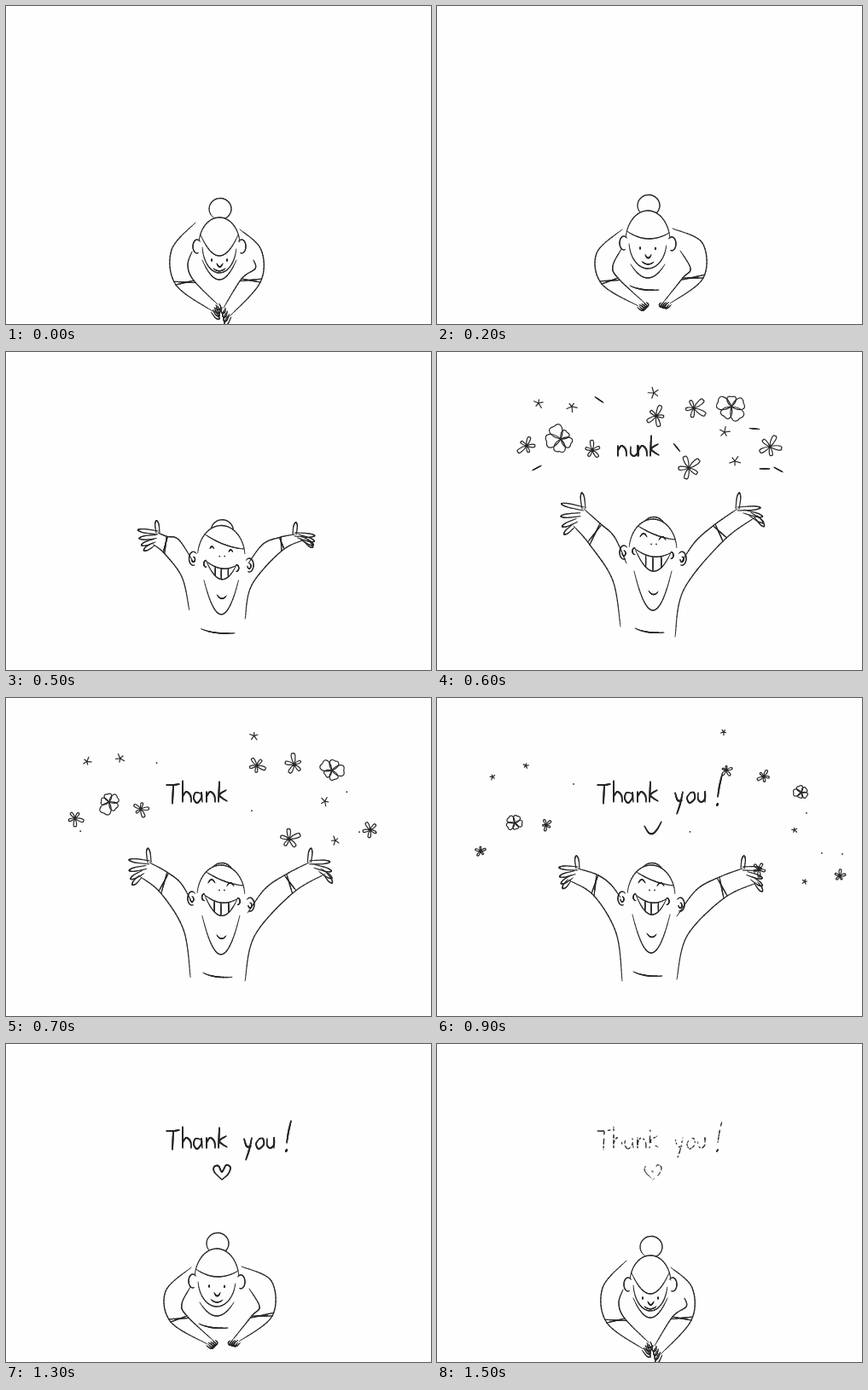
An HTML page with a canvas that plays this animation: 498x373 px, repeating every 1.6 s.

```html
<!DOCTYPE html>
<html lang="en">
<head>
<meta charset="utf-8">
<title>Thank you</title>
<style>
  html, body { margin: 0; width: 100%; height: 100%; overflow: hidden; background: #fdfefd; }
  canvas { display: block; width: 498px; height: 373px; }
</style>
</head>
<body>
<canvas id="stage" role="img" aria-label="Thank you !"></canvas>
<script>
const W = 498, H = 373, STEP = 100, STEPS = 16, N = 30, CUFF = 20;
const PAPER = '#fdfefd', INK = '#262626';
const canvas = document.getElementById('stage');
const ctx = canvas.getContext('2d');
const dpr = window.devicePixelRatio || 1;
canvas.width = W * dpr;
canvas.height = H * dpr;
ctx.scale(dpr, dpr);
ctx.lineCap = ctx.lineJoin = 'round';

const lerp = (a, b, t) => a + (b - a) * t;
const between = (p, q, t) => [lerp(p[0], q[0], t), lerp(p[1], q[1], t)];
const hash = (x, y) => {
  const v = Math.sin(x * 12.9898 + y * 78.233) * 43758.5453;
  return v - Math.floor(v);
};

// Lines are N + 1 samples
const sample = f => Array.from({ length: N + 1 }, (_, i) => f(i / N));

function curve(n) {
  const last = n.length / 2 - 1;
  return sample(s => {
    const i = Math.min(last - 1, Math.floor(s * last)), t = s * last - i;
    return [0, 1].map(c => {
      const at = k => n[2 * Math.max(0, Math.min(last, k)) + c];
      const a = at(i - 1), b = at(i), d = at(i + 1), e = at(i + 2);
      return b + t * ((d - a) + t * ((2 * a - 5 * b + 4 * d - e) + t * (3 * (b - d) + e - a))) / 2;
    });
  });
}
const line = (p, q) => sample(t => between(p, q, t));
const arc = (x, y, rx, ry, from, to) => sample(t => {
  const a = lerp(from, to, t) * Math.PI;
  return [x + rx * Math.cos(a), y + ry * Math.sin(a)];
});
const sagging = (x1, y1, x2, y2, sag) =>
  sample(t => [lerp(x1, x2, t), lerp(y1, y2, t) + sag * 4 * t * (1 - t)]);

// Pen pressure fades at both ends; loss wears holes into the line
function ink(pts, width = 1.35, loss = 0) {
  for (let i = 0; i < N; i++) {
    const [x, y] = pts[i];
    if (loss && hash(Math.floor(x / 1.6), Math.floor(y / 1.6)) < loss) continue;
    ctx.lineWidth = width * (.55 + .45 * Math.sqrt(Math.sin(Math.PI * (i + .5) / N)));
    ctx.beginPath();
    ctx.moveTo(x, y);
    ctx.lineTo(...pts[i + 1]);
    ctx.stroke();
  }
}
function dot(x, y, r) {
  ctx.beginPath();
  ctx.arc(x, y, r, 0, 7);
  ctx.fill();
}

// Arms: outer and inner edge from the shoulder to the wrist
const base = {
  x: 250, half: 26, out: 2, sag: 5, lid: 0, lips: 7, smile: 3, open: 0, collar: 20,
  hemW: 13, finger: 12, bend: 0, spread: 0, thumb: 0, side: 0, whoosh: 0
};
const bow = {
  ...base, top: 248, ear: 280, bun: 238, half: 24, browL: 268, browR: 268, sag: 25,
  eye: 298, chin: 313, neck: 298, vee: 321, hem: 333, hemW: 0, bend: 20, spread: 6,
  outL: [222, 254, 194, 286, 199, 327, 242, 358], inL: [218, 288, 213, 304, 220, 322, 248, 350],
  outR: [274, 262, 299, 286, 298, 324, 262, 364], inR: [290, 298, 292, 308, 276, 320, 255, 354]
};
const crouch = {
  ...base, x: 247, top: 240, ear: 276, bun: 234, browL: 264, browR: 266, sag: 8,
  eye: 284, chin: 308, neck: 303, vee: 319, hem: 333, finger: 8, bend: 5, spread: 5,
  outL: [217, 262, 187, 290, 193, 326, 236, 352], inL: [216, 285, 206, 305, 212, 319, 244, 349],
  outR: [276, 261, 311, 278, 312, 319, 273, 349], inR: [285, 287, 297, 308, 288, 319, 264, 349]
};
const push = {
  ...base, half: 27, top: 226, ear: 262, bun: 219, browL: 243, browR: 264, eye: 271, lid: 3,
  chin: 299, neck: 300, vee: 322, collar: 15, hem: 332, hemW: 24, finger: 14, side: 21, whoosh: 1,
  outL: [211, 239, 185, 229, 180, 262, 196, 296], inL: [214, 244, 207, 253, 206, 268, 210, 291],
  outR: [278, 250, 297, 234, 311, 262, 296, 304], inR: [284, 250, 285, 256, 286, 268, 278, 301]
};
const cheer = {
  ...base, x: 253, half: 28, out: 6, top: 196, ear: 233, bun: 206, browL: 204, browR: 220, sag: 3,
  eye: 217, lid: -4, chin: 238, lips: 21, smile: 7, open: 17, neck: 257, vee: 303, collar: 22,
  hem: 329, finger: 27, bend: -60, spread: -18, thumb: 19,
  outL: [222, 248, 208, 217, 191, 201, 172, 184], inL: [215, 322, 206, 268, 179, 226, 160, 204],
  outR: [286, 247, 303, 222, 326, 202, 352, 184], inR: [279, 334, 289, 279, 335, 222, 374, 193]
};
const beam = {
  ...cheer, x: 251, lips: 18, open: 14, neck: 254, vee: 299, hem: 326, finger: 22, bend: -50, thumb: 15,
  outL: [215, 234, 203, 218, 187, 207, 165, 200], inL: [217, 332, 210, 276, 184, 232, 155, 214],
  outR: [281, 256, 304, 225, 331, 210, 358, 200], inR: [281, 330, 293, 279, 336, 235, 374, 217]
};
const settle = {
  ...base, x: 251, out: 6, top: 213, ear: 250, bun: 209, browL: 237, browR: 240, sag: -4,
  eye: 247, chin: 284, lips: 12, smile: 4, open: 5, neck: 286, vee: 298, collar: 13,
  hem: 327, hemW: 8, finger: 22, bend: -58, spread: -8, thumb: 6,
  outL: [214, 238, 196, 234, 177, 235, 138, 264], inL: [216, 313, 212, 272, 176, 264, 152, 277],
  outR: [283, 248, 305, 237, 337, 233, 379, 257], inR: [281, 321, 289, 271, 337, 260, 366, 267]
};
const keys = [
  [0, bow], [2, crouch], [4, push], [6, cheer], [9, beam], [11, settle], [13, crouch], [15, bow]
];

function poseAt(step) {
  const i = Math.max(1, keys.findIndex(k => k[0] >= step));
  const [from, a] = keys[i - 1], [to, b] = keys[i];
  const u = (step - from) / (to - from), t = u * (2 - u);
  return Object.fromEntries(Object.keys(a).map(k =>
    [k, Array.isArray(a[k]) ? a[k].map((v, j) => lerp(v, b[k][j], t)) : lerp(a[k], b[k], t)]));
}

function finger([x, y], angle, length) {
  const c = Math.cos(angle), s = Math.sin(angle);
  const at = (u, v) => [x + c * u - s * v, y + s * u + c * v];
  ink(curve([at(0, -2), at(length * .7, -2.2), at(length, 0), at(length * .7, 2.2), at(0, 2)].flat()));
}

function drawArm(p, outer, inner, side) {
  const a = curve(outer), b = curve(inner), tip = a[N], heel = b[N];
  ink(a);
  ink(b);
  ink(line(a[CUFF], b[CUFF]));
  ink(line(a[CUFF - 1], b[CUFF + 1]));
  const from = between(a[CUFF], b[CUFF], .5), to = between(tip, heel, .5);
  const aim = Math.atan2(to[1] - from[1], to[0] - from[0]);
  for (let i = 0; i < 4; i++) {
    const turn = (p.bend + p.spread * (i - 1.5)) * Math.PI / 180;
    finger(between(tip, heel, i / 3), aim + side * turn, p.finger * (1 - .15 * i));
  }
  if (p.thumb > 3) finger(tip, -Math.PI / 2 + side * -.12, p.thumb);
}

function drawBody(p) {
  drawArm(p, p.outL, p.inL, 1);
  drawArm(p, p.outR, p.inR, -1);
  ink(sagging(p.x - p.collar, p.neck, p.x + p.collar, p.neck, p.vee - p.neck));
  if (p.hemW > 3) {
    ink(sagging(p.x - p.hemW - 8, p.hem - 5, p.x + p.hemW - 6, p.hem, 2));
    ink(sagging(p.x - p.hemW, p.hem - 2, p.x + p.hemW, p.hem, 1));
  }
  if (p.side > 15) for (const x of [p.x - 38, p.x + 27]) ink(line([x, p.hem - p.side], [x, p.hem]));
  if (p.whoosh === 1) {
    const [x, y] = p.outL.slice(-2), [u, v] = p.outR.slice(-2);
    ink(curve([x - 24, y - 37, x - 26, y - 22, x - 22, y - 8]));
    for (const i of [0, 1]) ink(line([u + 20 - 8 * i, v - 8], [u, v + 28 - 9 * i]));
  }
}

function drawHead(p) {
  const { x, half, top, ear, eye, chin } = p, tilt = p.browR - p.browL, grin = p.open > 9;
  ink(arc(x + 1, p.bun, 13, 12.5, .7, 2.6));
  ctx.fillStyle = PAPER;
  ctx.beginPath();
  ctx.ellipse(x, ear, half, ear - top, 0, Math.PI, 0);
  ctx.ellipse(x, ear, half - 4, Math.max(1, chin - ear), 0, 0, Math.PI);
  ctx.fill();
  ctx.fillStyle = INK;

  ink(arc(x, ear, half, ear - top, 1.04, 1.97));
  const edge = y => half * Math.sqrt(Math.max(0, 1 - ((ear - y) / (ear - top)) ** 2));
  ink(sagging(x - edge(p.browL), p.browL, x + edge(p.browR), p.browR, p.sag));
  if (!grin) ink(arc(x, ear, half - 4, chin - ear, .97, .05));
  for (const s of [-1, 1]) {
    const drop = s > 0 ? tilt * .45 : 0, ex = x + s * (half + p.out);
    ink(arc(ex, ear + 2 + drop, 5, 8, s < 0 ? 1.75 : 1.25, s < 0 ? .4 : 2.6));
    if (p.out > 3) ink(arc(ex, ear + 3 + drop, 2, 3, -.5, 1));
    const w = Math.min(4, Math.abs(p.lid)), ey = eye + drop / 2;
    ink(w < 1 ? line([x + s * 9, ey - 1], [x + s * 9, ey + 1])
      : sagging(x + s * 11 - w, ey, x + s * 11 + w, ey, p.lid));
  }

  const nose = lerp(eye, chin, .4), mouth = lerp(eye, chin, .65);
  if (grin) [-2, 4].forEach(d => dot(x + d, nose, .9));
  else ink(sagging(x - 3, nose - 2, x + 4, nose - 2, 4), 1.5);
  const lip = sag => sagging(x - p.lips, mouth, x + p.lips, mouth + tilt * .3, sag);
  ink(lip(p.smile));
  if (p.open < 2) return;
  const low = lip(p.smile + p.open), high = lip(p.smile);
  ink(low);
  if (grin) {
    for (const s of [-1, 1]) {
      ink(arc(x + s * p.lips, mouth + 3 + (s > 0 ? tilt * .3 : 0), 3, 4, s < 0 ? 1.5 : -.5, .5));
    }
    ink(sagging(x - 5, p.vee - 23, x + 6, p.vee - 22, 4));
  }
  for (const i of [9, 15, 22]) ink(line(high[i], low[i]));
}

// Handwriting: letters stand on a baseline at y = 0
const ARCH = '0 -6 4 -12 9 -8 10 0';
const letters = {
  T: '-8 -20 0 -20 7 -21/0 -20 -1 2', h: '0 -25 0 0/' + ARCH, n: '0 -12 0 0/' + ARCH,
  a: '8 -10 2 -11 0 -4 4 1 9 -5 9 -11 10 0', k: '0 -24 -1 0/8 -14 0 -8 9 -1',
  y: '0 -11 3 -2 8 -2/9 -12 6 2 2 14', o: '4 -11 0 -5 3 1 9 -4 8 -11 4 -11',
  u: '0 -11 0 -3 4 0 8 -4 8 -12 8 0', '!': '5 -32 2 -19 0 -6/0 2 -1 4'
};
const widths = { T: 11, h: 13, y: 14, o: 13, u: 9, ' ': 14 };
const tick = '-10 -9 -5 -1 0 0 5 -5 10 -14';
const heart = '0 0 -9 -9 -9 -15 -4 -16 0 -9 5 -17 10 -14 7 -6 0 0';

function scribble(shape, x, y, loss) {
  for (const part of shape.split('/')) {
    const n = part.split(' ').map((v, i) => +v + (i % 2 ? y : x));
    ink(curve(n), 1.95 * (1 - loss * .6), loss);
  }
}
function write(label, x, y, loss) {
  for (const c of label) {
    if (letters[c]) scribble(letters[c], x, y, loss);
    x += widths[c] || 15;
  }
}
function drawWords(step) {
  if (step < 6) return;
  const loss = Math.max(0, step - 13) * .25;
  ctx.globalAlpha = 1 - loss * .4;
  if (step === 6) write('nunk', 212, 122, 0);
  else write('Thank you !'.slice(0, 5 + 4 * (step - 7)), 196, 122, loss);
  if (step > 8) scribble(step === 9 ? tick : heart, 253, 159, loss);
  ctx.globalAlpha = 1;
}

// Flowers: x, y, radius at the burst; small ones are stars, the widest are round
const flowers = [
  [105, 110, 11], [145, 102, 15], [182, 115, 11], [257, 75, 12], [301, 66, 13], [345, 64, 15],
  [390, 111, 12], [295, 136, 14], [119, 60, 6], [158, 64, 6], [254, 48, 6], [337, 94, 6], [349, 128, 6]
];
const dashes = [[190, 56, .6], [372, 90, .1], [281, 112, .9], [117, 136, -.5], [384, 137, 0], [400, 138, .5]];

function bloom(x, y, size, r, turn) {
  if (r < 3) return dot(x, y, Math.max(.8, r * .45));
  const wide = size > 14 ? .62 : .25;
  ctx.save();
  ctx.translate(x, y);
  ctx.rotate(turn);
  ctx.lineWidth = 1.2;
  for (let i = 0; i < 5; i++) {
    const len = r * (.7 + .45 * hash(i, turn));
    ctx.rotate(Math.PI * .4);
    ctx.beginPath();
    ctx.moveTo(0, 0);
    if (size < 10) ctx.lineTo(len, 0);
    else {
      ctx.bezierCurveTo(len * .5, -len * wide, len * 1.2, -len * wide, len, 0);
      ctx.bezierCurveTo(len * 1.2, len * wide, len * .5, len * wide, 0, 0);
    }
    ctx.stroke();
  }
  ctx.restore();
}

// Thrown outward, slowed by the air, then falling and shrinking
function drawFlowers(step) {
  const s = step - 6;
  if (s < 0) return;
  const drift = 1.58 * (1 - Math.exp(-s / 3)), fall = 20 * Math.max(0, s - 3) ** 2;
  flowers.forEach(([x, y, size], i) => {
    if (size < 10 && s > 4) return;
    const dx = x < 215 ? -54 : 82, dy = .5 * Math.abs(x - 220) + .6 * (y - 90);
    bloom(x + dx * drift, y + dy * drift + fall, size, size * (1 - s * .15), i * 1.7 + s * .3);
  });
  dashes.forEach(([x, y, a]) => {
    const c = 6 * Math.cos(a), d = 6 * Math.sin(a);
    if (!s) ink(line([x - c, y - d], [x + c, y + d]));
    else if (s < 4) dot(x + (x - 250) * .5 * drift, y + 45 * drift, .9);
  });
}

function draw(step) {
  ctx.fillStyle = PAPER;
  ctx.fillRect(0, 0, W, H);
  ctx.fillStyle = ctx.strokeStyle = INK;
  const pose = poseAt(step);
  drawBody(pose);
  drawHead(pose);
  drawWords(step);
  drawFlowers(step);
}

let shown = -1;
const start = performance.now();
function play(now) {
  const step = Math.floor(Math.max(0, now - start) / STEP) % STEPS;
  if (step !== shown) draw(shown = step);
  requestAnimationFrame(play);
}
play(start);
</script>
</body>
</html>
```
